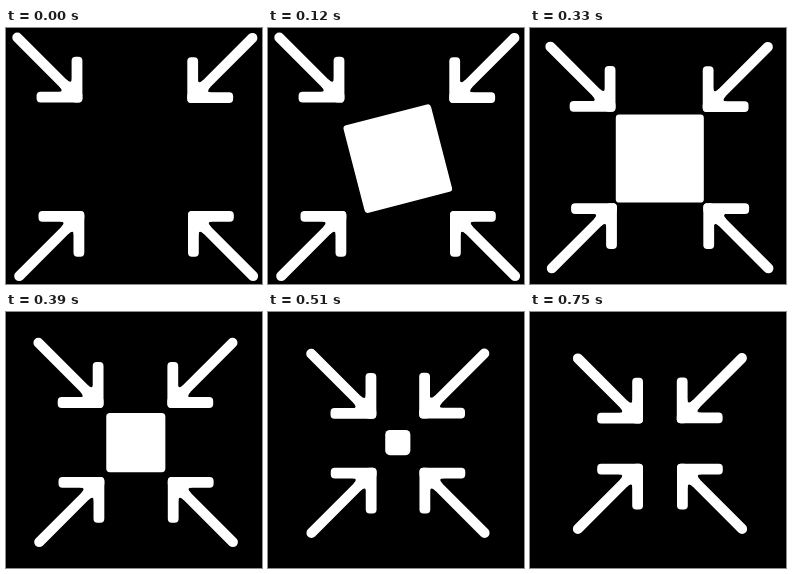
Write an HTML page that moves like this. It is 256x256 px and loops after 900 ms.

```html
<!DOCTYPE html>
<html>
<head>
<meta charset="utf-8">
<style>
  html, body { margin: 0; height: 100%; overflow: hidden; background: #000; }
  svg { display: block; width: 100%; height: 100%; fill: #fff; }
</style>
</head>
<body>
<svg viewBox="0 0 256 256">
  <defs>
    <!-- Tip corner at the origin, tail towards the lower right -->
    <g id="arrow">
      <rect width="45.8" height="10.8" rx="4"/>
      <rect width="10.8" height="45.8" rx="4"/>
      <path d="M7 7L65.1 65.1" stroke="#fff" stroke-width="10" stroke-linecap="round"/>
      <path d="M10 10V24H10.5Q10.5 18 16 23L23 16Q18 10.5 24 10.5V10Z"/>
    </g>
  </defs>
  <rect id="square"/>
</svg>
<script>
const LOOP = 900, STEP = 30, LAST = 750, TURN = 300;
const svg = document.querySelector('svg');
const square = document.getElementById('square');

// Tip position, travel and mirroring of each arrow
const arrows = [
  { x: 76.4, y: 74.6, dx: 36.6, dy: 36.9, sx: -1, sy: -1 },
  { x: 181.3, y: 75, dx: -34.5, dy: 36.2, sx: 1, sy: -1 },
  { x: 78.3, y: 183, dx: 34.7, dy: -31.2, sx: -1, sy: 1 },
  { x: 182, y: 183, dx: -35, dy: -31.2, sx: 1, sy: 1 },
];
for (const arrow of arrows) {
  arrow.node = document.createElementNS(svg.namespaceURI, 'use');
  arrow.node.setAttribute('href', '#arrow');
  svg.append(arrow.node);
}

// Exponential ease-out that reaches exactly 1 at the end
function easeOut(t, k) {
  const p = Math.min(1, Math.max(0, t));
  return (1 - Math.exp(-k * p)) / (1 - Math.exp(-k));
}

function drawSquare(t) {
  const grow = easeOut(t / TURN, 4.5);
  const shrink = easeOut((t - TURN) / (LAST - TURN), 2.75);
  const size = t < LAST ? 107 * grow - 106 * shrink : 0;
  const attributes = {
    x: -size / 2, y: -size / 2, width: size, height: size,
    rx: size && Math.min(size / 2, 3 + 40 / size),
    transform: `translate(129.8 130.6) rotate(${-93 * (1 - grow)})`,
  };
  for (const name in attributes) square.setAttribute(name, attributes[name]);
}

function drawArrows(t) {
  const move = easeOut((t - TURN) / (LAST - TURN), 4.2);
  for (const { node, x, y, dx, dy, sx, sy } of arrows) {
    node.setAttribute('transform',
      `translate(${x + dx * move} ${y + dy * move}) scale(${sx} ${sy})`);
  }
}

function frame() {
  const time = performance.now() % LOOP;
  const t = Math.min(LAST, Math.floor(time / STEP) * STEP);
  drawSquare(t);
  drawArrows(t);
  requestAnimationFrame(frame);
}
frame();
</script>
</body>
</html>
```
